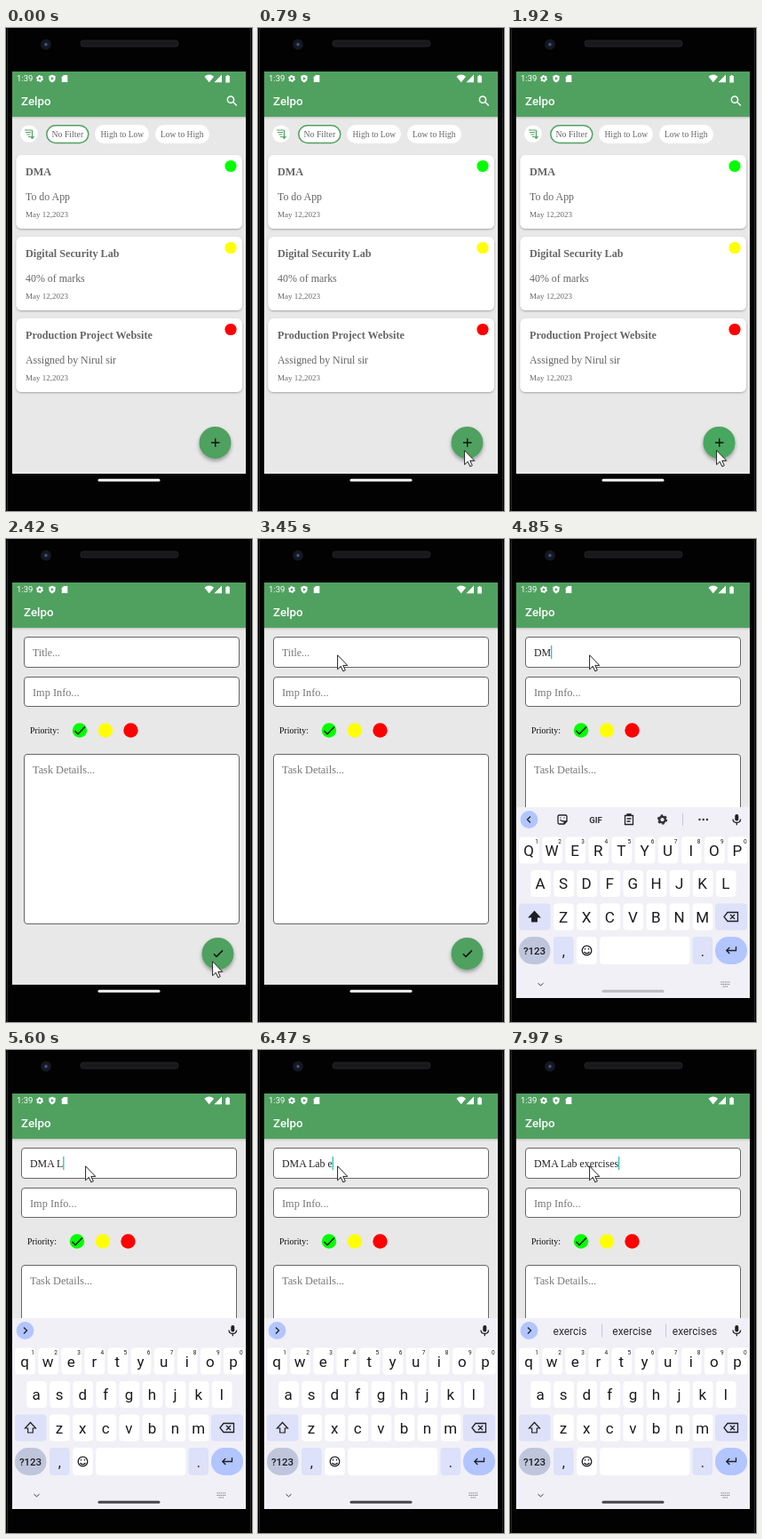
These frames come from a looping animation (277 by 544 pixels, 8000 ms). An HTML page:

```html
<!DOCTYPE html>
<html lang="en">
<head>
<meta charset="utf-8">
<title>Task app</title>
<style>
  html, body { margin: 0; height: 100%; overflow: hidden; background: #000; }
  svg { display: block; width: 100%; height: 100%; }
  text { font-family: Roboto, sans-serif; white-space: pre; }
  .serif, .serif text { font-family: "Liberation Serif", serif; }
  .line { fill: none; stroke: #1f2024; stroke-width: 1.3; }
  .thin { fill: none; stroke: #333; stroke-width: 1; }
  .field { fill: #fff; stroke: #666; stroke-width: 1; }
  .mid { text-anchor: middle; }
</style>
</head>
<body>
<svg viewBox="0 0 277 544">
  <defs>
    <clipPath id="screen"><path d="M7 49h263v468H7z"/></clipPath>
    <filter id="soft" x="-30%" y="-30%" width="160%" height="170%">
      <feDropShadow dx="0" dy="1" stdDeviation="1" flood-opacity=".3"/>
    </filter>
    <filter id="lift" x="-40%" y="-40%" width="180%" height="190%">
      <feDropShadow dx="0" dy="2.5" stdDeviation="2.2" flood-opacity=".35"/>
    </filter>
    <linearGradient id="fade" x2="0" y2="1">
      <stop stop-opacity=".14"/><stop offset="1" stop-opacity="0"/>
    </linearGradient>
    <g id="gear">
      <circle r="2.9" fill="none" stroke="currentColor" stroke-width="2.2"/>
      <circle r="4.2" fill="none" stroke="currentColor" stroke-width="1.5" stroke-dasharray="2.2 2.2"/>
    </g>
  </defs>

  <!-- phone body -->
  <path d="M0 0h277v544H0z"/>
  <rect x="1.5" y="-25" width="274" height="600" rx="30" fill="#020203" stroke="#29292c"/>
  <rect x="84" y="14" width="110" height="7" rx="3" fill="#19191b" stroke="#232326"/>
  <circle cx="45" cy="18.5" r="6" fill="#15171d"/>
  <circle cx="45" cy="18.5" r="3" fill="#1b2238"/>
  <circle cx="45" cy="18.5" r="1.300" fill="#566a9c"/>

  <g clip-path="url(#screen)">
    <path d="M7 49h263v453H7z" fill="#e8e8e8"/>
    <path d="M105 509.300h67" stroke="#f2f2f2" stroke-width="3" stroke-linecap="round"/>

    <g id="list">
      <g class="serif" font-size="9.7" fill="#666">
        <circle cx="26" cy="119.300" r="9.800" fill="#fff"/>
        <path d="M21 115h8M22 117.500h6M23.500 120h4M25 122.500h2M29.500 115v9M27.500 122l2 2.300 2-2.300" fill="none" stroke="#50a160" stroke-width="1.200"/>
        <g id="chips"></g>
      </g>
      <g id="cards" class="serif" fill="#666"></g>
      <g>
        <circle cx="235.500" cy="467" r="18" fill="#50a160" filter="url(#lift)"/>
        <circle id="ripple" cx="235.500" cy="467" r="18" fill="#3fae5c"/>
        <path d="M231 467h9.500M235.750 462.250v9.500" stroke="#111" stroke-width="1.400"/>
      </g>
    </g>

    <g id="form" class="serif" font-size="11.900" fill="#777">
      <rect class="field" x="17.500" y="110.500" width="242" height="34" rx="3.500"/>
      <rect class="field" x="17.500" y="155.500" width="242" height="33" rx="3.500"/>
      <rect class="field" x="17.500" y="242.500" width="242" height="191" rx="3.500"/>
      <text id="hint" x="27" y="132">Title...</text>
      <text x="27" y="176.700" font-size="12.300">Imp Info...</text>
      <text x="27" y="263.500" font-size="12.300">Task Details...</text>
      <text x="24" y="219" font-size="9.900" fill="#111">Priority:</text>
      <circle cx="80" cy="215.500" r="8.200" fill="#0f0"/>
      <circle cx="109" cy="215.500" r="8.200" fill="#ff0"/>
      <circle cx="137.500" cy="215.500" r="8.200" fill="#f00"/>
      <path d="M74.500 216l3.500 3.700 8-8.200" fill="none" stroke="#111" stroke-width="1.500"/>
      <circle cx="235.500" cy="467" r="18" fill="#50a160" filter="url(#lift)"/>
      <path d="M231 467.300l3 3.100 7-7" fill="none" stroke="#111" stroke-width="1.500"/>
      <text id="typed" x="27" y="132" fill="#222"></text>
      <path id="caret" d="M0 120v15" stroke="#2cc5b5" stroke-width="1.300"/>
    </g>

    <!-- status and app bar -->
    <path d="M7 100h263v3H7z" fill="url(#fade)"/>
    <path d="M7 49h263v51H7z" fill="#50a160"/>
    <g fill="#fff" color="#fff">
      <text x="12" y="60.300" font-size="9.500">1:39</text>
      <use href="#gear" transform="translate(38 57) scale(.8)"/>
      <path d="M52 52.700l3.600 1.300v2.800q0 3.200-3.600 4.700-3.600-1.500-3.600-4.700v-2.800z"/>
      <path d="M51 55l3 1.900-3 1.900z" fill="#50a160"/>
      <path d="M65 53h4.300v8h-6.500V55.200z"/>
      <path d="M223.500 54.700q5.300-4.300 10.600 0l-5.300 6.600zM243 52.500v8.800h-8.500zM247.300 54h1.400v-1h1.800v1h1.400v7.500h-4.600z"/>
      <text id="name" x="17" y="87" font-size="13.300" font-weight="500">Zelpo</text>
    </g>
    <g id="search" fill="none" stroke="#fff" stroke-width="1.500">
      <circle cx="253" cy="80.700" r="3.600"/><path d="M255.600 83.300l4.200 4.200"/>
    </g>

    <g id="keyboard">
      <path d="M7 302h263v215H7z" fill="#f1f0f7"/>
      <circle cx="21.500" cy="316" r="9.900" fill="#b2c5ff"/>
      <path id="arrow" class="line"/>
      <g id="tools" color="#33343a">
        <path class="line" d="M61 321h-5.500q-1.500 0-1.500-1.500v-7q0-1.500 1.500-1.500h7q1.500 0 1.500 1.500v5.500zM61 321v-3h3M56.500 316q1.500 2.500 4 1.500M57 313.500v1M61 313.500v1"/>
        <text class="mid" x="96.500" y="319.500" font-size="9.500" font-weight="700" fill="#33343a">GIF</text>
        <path class="line" d="M129.500 311.500h9v10h-9zM132 311.500v-1.500h4v1.500M131.500 315h5M131.500 318h4"/>
        <use href="#gear" transform="translate(171.500 316) scale(1.150)"/>
        <path d="M194.500 309v14" stroke="#c8c8d0"/>
        <path d="M213.500 316h9" stroke="#33343a" stroke-width="2.400" stroke-linecap="round" stroke-dasharray="0 4.200"/>
      </g>
      <g id="words" class="mid" font-size="12" fill="#2b2c31">
        <path d="M103.500 308.500v15M175.500 308.500v15" stroke="#c8c8d0"/>
        <text x="67.500" y="320.500"></text><text x="137.500" y="320.500"></text><text x="208" y="320.500"></text>
      </g>
      <rect x="253.300" y="310" width="4" height="7.500" rx="2" fill="#1f2024"/>
      <path class="line" d="M251 315.500q.3 4 4.300 4t4.300-4M255.300 319.500v2.700"/>
      <g id="keys" class="mid" fill="#1b1b1f"></g>
      <path id="shift" d="M27.500 419.500l6 6.500h-3.200v5h-5.600v-5h-3.200z" stroke="#1f2024" stroke-width="1.200"/>
      <path class="line" d="M245 420.500h11.500v10H245l-4-5zM248 423l5 5M253 423l-5 5"/>
      <circle class="line" cx="86.500" cy="463.500" r="5.300"/>
      <path class="line" d="M84.500 461v1.600M88.500 461v1.600M83.500 465q3 3.500 6 0"/>
      <path class="line" d="M254.500 459v4.500h-10.500M247.300 460l-3.500 3.500 3.500 3.500"/>
      <path class="thin" d="M31.500 500.300l3 2.700 3-2.700"/>
      <path d="M237.500 499h10M237.500 501.500h10M239.500 504h6" stroke="#777" stroke-width="1.200" stroke-dasharray="1.300 .8"/>
      <path id="pill" d="M105 509.300h67" stroke-width="3" stroke-linecap="round"/>
    </g>
  </g>

  <path id="mouse" d="M.6.800v16l3.700-3.500 2.500 5.600 2.500-1.100-2.500-5.400h5z" fill="#fff" stroke="#222" stroke-linejoin="round"/>
</svg>

<script>
const $ = id => document.getElementById(id);
const show = (id, on) => $(id).setAttribute("display", on ? "inline" : "none");
const move = (id, x, y) => $(id).setAttribute("transform", `translate(${x} ${y})`);
const box = (x, y, w, h, r, fill, more = "") =>
  `<rect x="${x}" y="${y}" width="${w}" height="${h}" rx="${r}" fill="${fill}" ${more}/>`;
const label = (x, y, s, size, more = "") =>
  `<text x="${x}" y="${y}" font-size="${size}" ${more}>${s}</text>`;

// Last step whose time has come
const at = (steps, t) => steps.findLast(s => s[0] <= t);

$("chips").innerHTML =
  box(45.8, 109.8, 47, 19.6, 9.8, "#fff", 'stroke="#50a160" stroke-width="1.5"') +
  box(100, 109, 61, 21, 10.5, "#fff") + box(168, 109, 61, 21, 10.5, "#fff") +
  label(51.5, 123, "No Filter", 9.8) + label(106.5, 123, "High to Low", 9.5) + label(174, 123, "Low to High", 9.5);

$("cards").innerHTML = [
  ["DMA", "To do App", "#0f0"],
  ["Digital Security Lab", "40% of marks", "#ff0"],
  ["Production Project Website", "Assigned by Nirul sir", "#f00"]
].map(([title, info, color], i) => `<g transform="translate(0 ${i * 92})">` +
  box(11.5, 143, 254.5, 83, 6, "#fff", 'filter="url(#soft)"') +
  label(22, 165.5, title, 12.2, 'font-weight="700"') +
  label(22, 193.5, info, 11.9) + label(22, 213, "May 12,2023", 9) +
  `<circle cx="253" cy="155.500" r="6.600" fill="${color}"/></g>`).join("");

function drawKeys(caps) {
  const rows = [["qwertyuiop", 21.5, 335.5], ["asdfghjkl", 34.5, 373], ["zxcvbnm", 60.5, 410.5]];
  let out = "";
  for (const [letters, x0, y] of rows)
    [...letters].forEach((c, i) => {
      const x = x0 + i * 26.1;
      out += box(x - 11.3, y, 22.6, 30, 4, "#fff") +
        label(x - .5, y + 21.3, caps ? c.toUpperCase() : c, 17);
      if (y < 340) out += label(x + 8.5, y + 7.5, (i + 1) % 10, 6.5);
    });
  out += box(10, 410.5, 35.5, 30, 4, "#dde1f9") + box(231, 410.5, 36, 30, 4, "#dde1f9") +
    box(10, 448, 35.5, 31, 15, "#bfc6dc") + label(27.5, 468, "?123", 11.5, 'font-weight="500"') +
    box(49, 448, 22.6, 31, 4, "#dde1f9") + label(60.3, 470, ",", 16) +
    box(75.2, 448, 22.6, 31, 4, "#fff") + box(101.3, 448, 101, 31, 4, "#fff") +
    box(205.5, 448, 22.6, 31, 4, "#dde1f9") + label(216.8, 470, ".", 16) +
    box(231, 448, 36, 31, 15, "#b2c5ff");
  $("keys").innerHTML = out;
  $("shift").setAttribute("fill", caps ? "#1f2024" : "none");
}

const mouse = [
  [0, -50, 0], [430, 219, 498], [550, 225, 487], [670, 230, 479], [790, 232, 475],
  [2540, 230, 455], [2660, 212, 370], [2780, 170, 210], [2900, 136, 125],
  [3150, 115, 128], [3300, 90, 130], [3450, 89, 130]
];
const ripple = [[0, 0, 18], [1440, .3, 18], [1800, .8, 10], [1920, .45, 18]];
const rise = [[0, 215], [4220, 80], [4340, 0]];
const typing = [
  [0, ""], [4610, "D"], [4850, "DM"], [4970, "DMA"], [5210, "DMA "],
  [5600, "DMA L"], [5840, "DMA La"], [6080, "DMA Lab"], [6350, "DMA Lab "],
  [6470, "DMA Lab e"], [6710, "DMA Lab ex"], [6960, "DMA Lab exe"],
  [7200, "DMA Lab exer"], [7350, "DMA Lab exerc"], [7600, "DMA Lab exerci"],
  [7720, "DMA Lab exercis"], [7970, "DMA Lab exercises"]
];
const suggest = [
  [0, ""], [5720, "L Lab Let"], [5960, "La Lab Last"], [6200, "Lab Labs Lay"], [6350, ""],
  [6590, "e each end"], [6960, "ex exam exit"], [7200, "exe exercise exercises"],
  [7350, "exer exercise exercises"], [7600, "exerc exercise exercises"],
  [7720, "exerci exercise exercises"], [7970, "exercis exercise exercises"]
];

let caps;
function draw(t) {
  const form = t >= 2420;
  const slide = form && t < 2540 ? 3 : 0;
  show("list", !form);
  show("search", !form);
  show("form", form);
  move("form", slide, 0);
  move("name", slide, 0);

  const [, mx, my] = at(mouse, t);
  move("mouse", mx, my);
  const [, glow, r] = at(ripple, t);
  $("ripple").setAttribute("opacity", glow);
  $("ripple").setAttribute("r", r);

  const typed = at(typing, t)[1];
  $("typed").textContent = typed;
  show("hint", !typed);
  show("caret", t >= 3850);
  if (form) move("caret", 27.5 + $("typed").getComputedTextLength(), 0);

  show("keyboard", t >= 4220);
  move("keyboard", 0, at(rise, t)[1]);
  const upper = t < 5210;
  if (upper !== caps) drawKeys(caps = upper);

  const tools = t < 5450 || (t >= 6350 && t < 6470);
  show("tools", tools);
  $("arrow").setAttribute("d", tools ? "M23 312.500l-3.500 3.500 3.500 3.500" : "M20 312.500l3.500 3.500-3.500 3.500");
  $("pill").setAttribute("stroke", t < 5450 ? "#bdbcc2" : "#47474c");
  const words = at(suggest, t)[1];
  show("words", words);
  words.split(" ").forEach((w, i) => $("words").children[i + 1].textContent = w);
}

const start = performance.now();
function frame() {
  draw((performance.now() - start) % 8000);
  requestAnimationFrame(frame);
}
frame();
</script>
</body>
</html>
```
